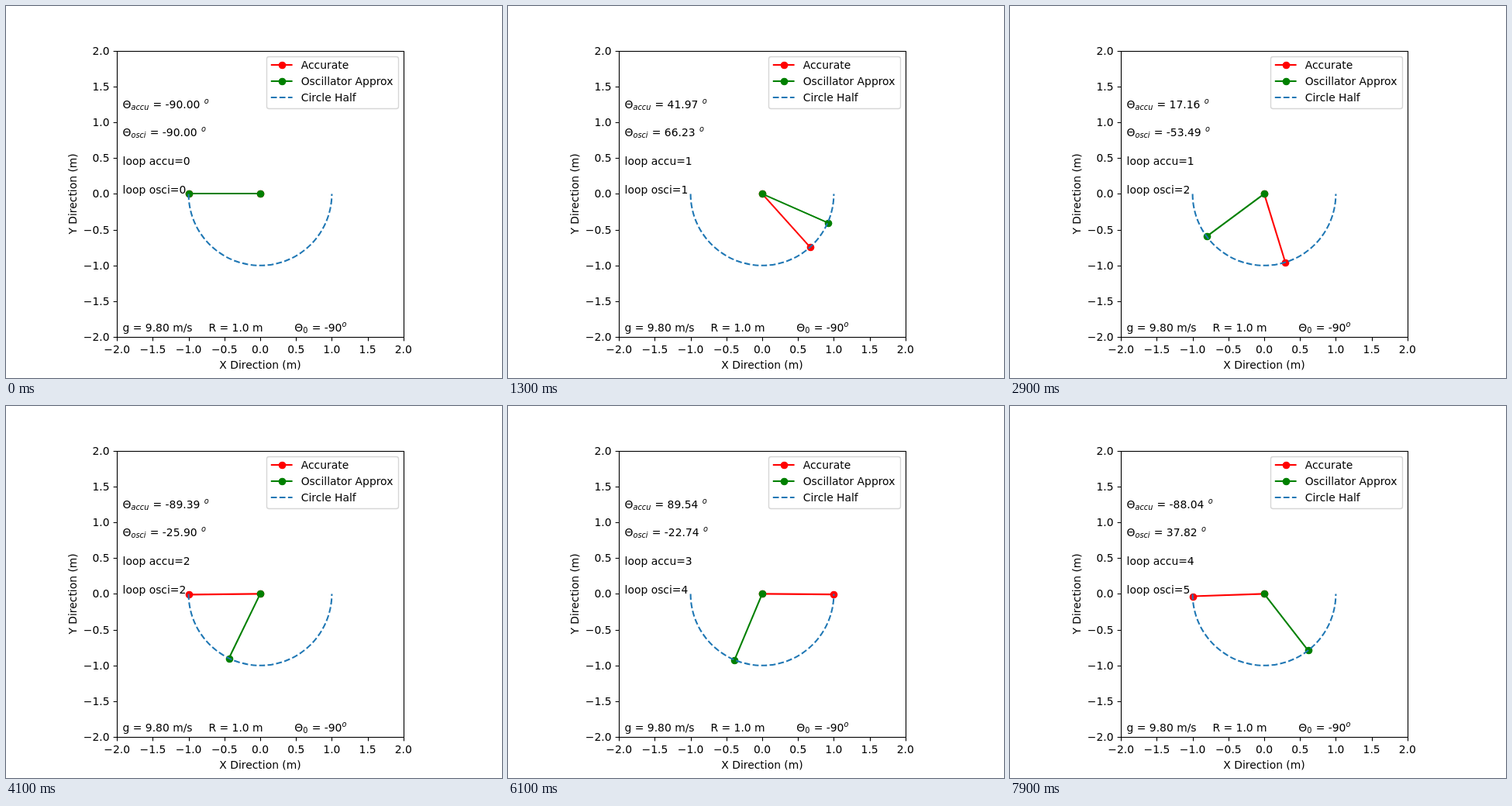
An HTML page with a canvas for the animation above (8000 ms loop, 640 px wide and 480 px high).

```html
<!DOCTYPE html>
<html lang="en">
<head>
<meta charset="utf-8">
<title>Pendulum comparison</title>
<style>
  html, body { margin: 0; width: 100%; height: 100%; overflow: hidden; background: #fff; }
  canvas { display: block; width: 640px; height: 480px; }
</style>
</head>
<body>
<canvas id="stage" width="640" height="480"></canvas>
<script>
const ctx = document.getElementById('stage').getContext('2d');

const FRAME_MS = 100, FRAMES = 80;
const STEP = 0.0589178;            // simulated seconds per frame
const G = 9.8, START = -Math.PI / 2;
const EM = 125 / 9, PT = 100 / 72;
const LEFT = 143.2, TOP = 57.6, SIDE = 369.6, UNIT = SIDE / 4;
const CX = LEFT + SIDE / 2, CY = TOP + SIDE / 2;
const FACE = '"DejaVu Sans", Verdana, sans-serif';
const BODY = `${EM}px ${FACE}`;
const SMALL = `${EM * 0.7}px ${FACE}`;
const SMALL_ITALIC = `italic ${EM * 0.7}px ${FACE}`;
const LINE = 1.5 * PT;
const DASH = [3.7 * LINE, 1.6 * LINE];
const RED = '#ff0000', GREEN = '#008000', BLUE = '#1f77b4';

const px = v => CX + v * UNIT;
const py = v => CY - v * UNIT;
const snap = v => Math.round(v) + 0.5;

// Full pendulum equation, fourth-order Runge-Kutta
function swing() {
  const sub = 40, h = STEP / sub, angles = [];
  const acc = a => -G * Math.sin(a);
  let a = START, w = 0;
  for (let i = 0; i < FRAMES; i++) {
    angles.push(a);
    for (let j = 0; j < sub; j++) {
      const a1 = w, w1 = acc(a);
      const a2 = w + h / 2 * w1, w2 = acc(a + h / 2 * a1);
      const a3 = w + h / 2 * w2, w3 = acc(a + h / 2 * a2);
      const a4 = w + h * w3, w4 = acc(a + h * a3);
      a += h / 6 * (a1 + 2 * a2 + 2 * a3 + a4);
      w += h / 6 * (w1 + 2 * w2 + 2 * w3 + w4);
    }
  }
  return angles;
}

// Running number of passes through the lowest point
function passes(angles) {
  let n = 0;
  return angles.map((a, i) => i && a * angles[i - 1] < 0 ? ++n : n);
}

const accurate = swing();
const approx = accurate.map((_, i) => START * Math.cos(Math.sqrt(G) * STEP * i));
const accuratePasses = passes(accurate);
const approxPasses = passes(approx);

function text(str, x, y, font = BODY, align = 'left') {
  ctx.font = font;
  ctx.textAlign = align;
  ctx.fillStyle = '#000';
  ctx.fillText(str, x, y);
  return x + ctx.measureText(str).width;
}

function stroke(color, width, points) {
  ctx.strokeStyle = color;
  ctx.lineWidth = width;
  ctx.beginPath();
  points.forEach(([x, y]) => ctx.lineTo(x, y));
  ctx.stroke();
}

function dot(color, x, y) {
  ctx.fillStyle = color;
  ctx.beginPath();
  ctx.arc(snap(x), snap(y), 3.5 * PT, 0, 2 * Math.PI);
  ctx.fill();
}

function pendulum(color, angle) {
  const x = px(Math.sin(angle)), y = py(-Math.cos(angle));
  const flat = Math.abs(y - CY) < 1e-4;
  stroke(color, LINE, flat ? [[CX, 242], [x, 242]] : [[CX, CY], [x, y]]);
  dot(color, CX, CY);
  dot(color, x, y);
}

function halfCircle() {
  ctx.strokeStyle = BLUE;
  ctx.lineWidth = LINE;
  ctx.setLineDash(DASH);
  ctx.beginPath();
  ctx.arc(CX, CY, UNIT, Math.PI, 0, true);
  ctx.stroke();
  ctx.setLineDash([]);
}

function axes() {
  const w = 0.8 * PT, tick = 3.5 * PT;
  ctx.strokeStyle = '#000';
  ctx.lineWidth = w;
  ctx.strokeRect(143.5, 58.5, 370, 369);
  for (let v = -2; v <= 2; v += 0.5) {
    const x = px(v), y = py(v);
    const label = (v < 0 ? '\u2212' : '') + Math.abs(v).toFixed(1);
    stroke('#000', w, [[snap(x), 427.5], [snap(x), 427.5 + tick]]);
    stroke('#000', w, [[143.5, snap(y)], [143.5 - tick, snap(y)]]);
    text(label, x, 448, BODY, 'center');
    text(label, LEFT - 2 * tick, Math.round(y + 5), BODY, 'right');
  }
  text('X Direction (m)', CX, 468, BODY, 'center');
  ctx.save();
  ctx.translate(91, CY);
  ctx.rotate(-Math.PI / 2);
  text('Y Direction (m)', 0, 0, BODY, 'center');
  ctx.restore();
}

// Theta with a subscript, a value, and a raised degree sign
function thetaText(sub, subFont, value, x, y, gap) {
  x = text('\u0398', x, y);
  x = text(sub, x, y + 2, subFont) + 0.8;
  x = text(' = ' + value, x, y);
  text('o', x + gap, y - 6, SMALL_ITALIC);
}

function notes(i) {
  const x = k => LEFT + k * SIDE;
  const y = k => Math.round(TOP + (1 - k) * SIDE);
  const deg = a => (a * 180 / Math.PI).toFixed(2) + ' ';
  thetaText('accu', SMALL_ITALIC, deg(accurate[i]), x(0.02), y(0.8), 1);
  thetaText('osci', SMALL_ITALIC, deg(approx[i]), x(0.02), y(0.7), 1);
  text('loop accu=' + accuratePasses[i], x(0.02), y(0.6));
  text('loop osci=' + approxPasses[i], x(0.02), y(0.5));
  text('g = 9.80 m/s', x(0.02), y(0.02));
  text('R = 1.0 m', x(0.32), y(0.02));
  thetaText('0', SMALL, '-90', x(0.62), y(0.02), 0.2);
}

function legend() {
  ctx.beginPath();
  ctx.roundRect(336.5, 65.5, 170, 67, 0.2 * EM);
  ctx.fillStyle = 'rgba(255,255,255,0.8)';
  ctx.fill();
  ctx.strokeStyle = 'rgba(204,204,204,0.8)';
  ctx.lineWidth = PT;
  ctx.stroke();
  const rows = [['Accurate', RED], ['Oscillator Approx', GREEN], ['Circle Half', BLUE]];
  rows.forEach(([label, color], k) => {
    const y = 76 + 21 * k, dashed = color === BLUE;
    ctx.setLineDash(dashed ? DASH : []);
    stroke(color, LINE, [[341.8, y], [369.6, y]]);
    ctx.setLineDash([]);
    if (!dashed) dot(color, 355.7, y);
    text(label, 380.7, y + 5);
  });
}

function draw(ms) {
  const i = Math.floor(ms / FRAME_MS) % FRAMES;
  ctx.fillStyle = '#fff';
  ctx.fillRect(0, 0, 640, 480);
  pendulum(RED, accurate[i]);
  pendulum(GREEN, approx[i]);
  halfCircle();
  axes();
  notes(i);
  legend();
}

const begin = performance.now();
function tick() {
  draw(performance.now() - begin);
  requestAnimationFrame(tick);
}
tick();
</script>
</body>
</html>
```
